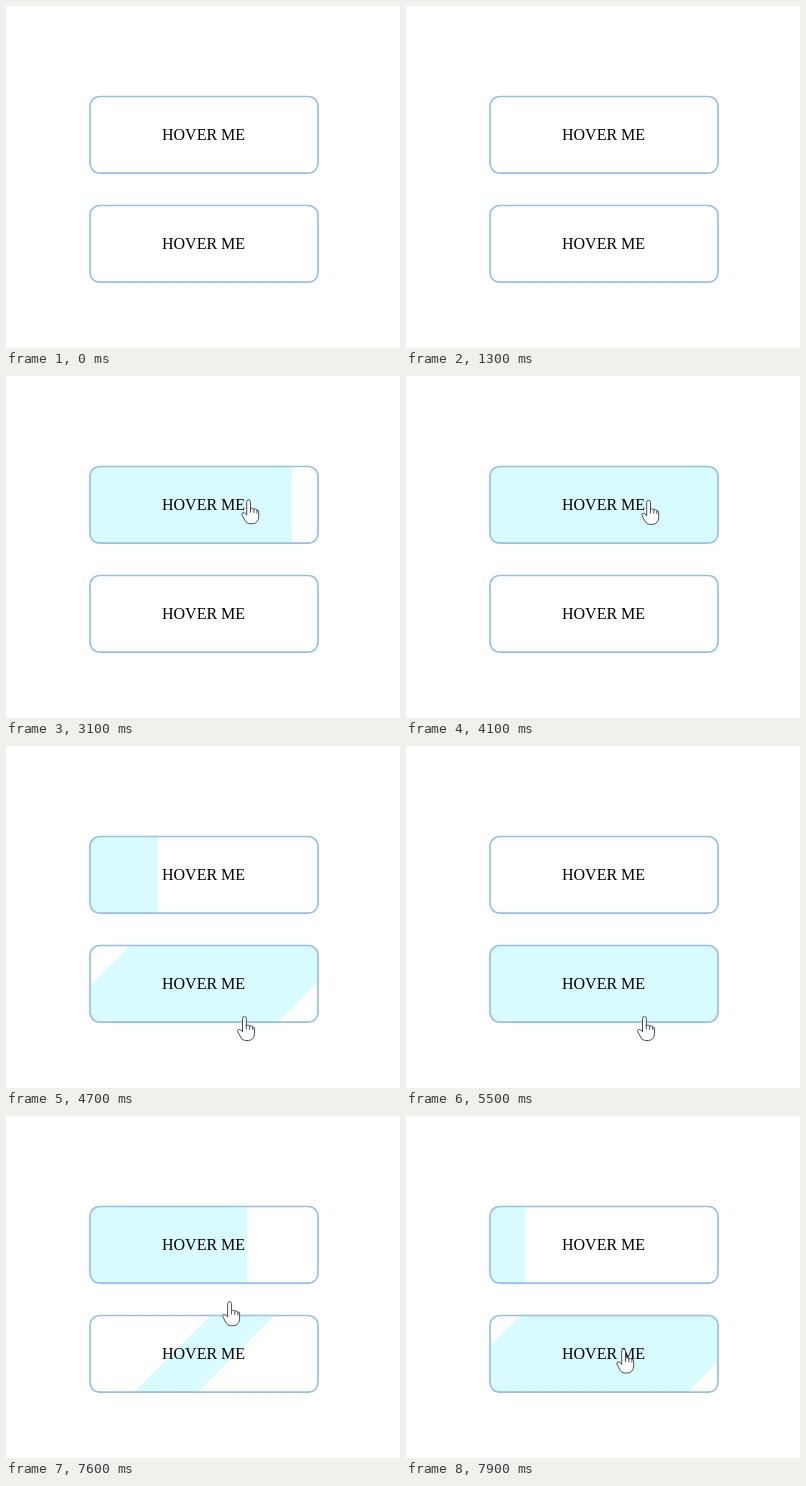
Animation of 394 by 342 pixels, one loop 8000 ms. Source, as an HTML page with a canvas:

```html
<!DOCTYPE html>
<html lang="en">
<head>
<meta charset="utf-8">
<title>Hover buttons</title>
<style>
  html, body { margin: 0; width: 100%; height: 100%; overflow: hidden; background: #fff; }
  canvas { display: block; width: 394px; height: 342px; }
</style>
</head>
<body>
<canvas id="stage"></canvas>
<script>
const W = 394, H = 342, LOOP = 8000, STEP = 100;
const canvas = document.getElementById('stage');
const ctx = canvas.getContext('2d');
const dpr = window.devicePixelRatio || 1;
canvas.width = W * dpr;
canvas.height = H * dpr;

const BOX = { x: 84, w: 228, h: 76.6, r: 9.5 };
const BORDER = '#92bfec', FILL = '#d8fbff';

// Moments when the pointer enters and leaves each button, alternating.
const buttons = [
  { y: 90.5, toggles: [2500, 4285, 7080, 7532], paint: paintSlide },
  { y: 199.5, toggles: [4382, 7055, 7630], paint: paintDiagonal }
];

// The pointer appears, then glides to each next resting place.
const appear = { time: 2500, x: 242.7, y: 123.7 };
const glides = [
  { from: 4080, to: 4600, x: 238.5, y: 270.5 },
  { from: 6830, to: 7300, x: 234.5, y: 98.5 },
  { from: 7300, to: 7800, x: 217.7, y: 233 }
];

const hand = new Path2D('M-2 15V2a1.9 1.9 0 0 1 3.8 0V9q2-1.3 3.4.6q2-1 3 .8q1.8-.3 1.8 2V17' +
  'q0 3-1.8 5q-1.5 2-4.2 2h-3q-3 0-4.3-2.5L-6.6 15.5q-1-2 .8-2.6q1.6-.3 3.8 2.1z');
const knuckles = new Path2D('M1.8 8.5v4M5.2 9.6v3.2M8.2 10.4v2.8');

// cubic-bezier(.25, .1, .25, 1)
function ease(x) {
  if (x <= 0) return 0;
  if (x >= 1) return 1;
  const curve = (a, b, s) => 3 * a * s * (1 - s) ** 2 + 3 * b * s * s * (1 - s) + s ** 3;
  let lo = 0, hi = 1;
  for (let i = 0; i < 30; i++) {
    const mid = (lo + hi) / 2;
    if (curve(0.25, 0.25, mid) < x) lo = mid; else hi = mid;
  }
  return curve(0.1, 1, lo);
}

function smooth(t, from, to) {
  const u = Math.min(1, Math.max(0, (t - from) / (to - from)));
  return u * u * (3 - 2 * u);
}

// One-second transition; a reversal takes time in proportion to what is left.
function level(toggles, t) {
  let from = 0, to = 0, start = 0, span = 1000;
  const at = s => from + (to - from) * ease((s - start) / span);
  for (const time of toggles) {
    if (time > t) break;
    from = at(time);
    to = 1 - to;
    start = time;
    span = Math.max(1, 1000 * Math.abs(to - from));
  }
  return at(t);
}

function paintSlide(v, y) {
  ctx.fillRect(BOX.x, y, BOX.w * v, BOX.h);
}

function paintDiagonal(v, y) {
  const thick = 289 * v;
  ctx.translate(BOX.x + BOX.w / 2, y + BOX.h / 2);
  ctx.rotate(-Math.PI / 4);
  ctx.fillRect(-BOX.w / 2, -thick / 2, BOX.w, thick);
}

function drawButton({ y, toggles, paint }, t) {
  const frame = new Path2D();
  frame.roundRect(BOX.x, y, BOX.w, BOX.h, BOX.r);
  const v = level(toggles, t);
  if (v > 0) {
    ctx.save();
    ctx.clip(frame);
    ctx.fillStyle = FILL;
    paint(v, y);
    ctx.restore();
  }
  ctx.strokeStyle = BORDER;
  ctx.lineWidth = 1.7;
  ctx.stroke(frame);
  ctx.fillStyle = '#000';
  ctx.font = '16px "Liberation Serif", "Times New Roman", serif';
  ctx.fontKerning = 'none';
  ctx.fillText('HOVER ME', 156, y + 43.5);
}

function drawPointer(t) {
  if (t < appear.time) return;
  let { x, y } = appear;
  for (const g of glides) {
    const k = smooth(t, g.from, g.to);
    x += (g.x - x) * k;
    y += (g.y - y) * k;
  }
  ctx.save();
  ctx.translate(x, y);
  ctx.fillStyle = '#fff';
  ctx.strokeStyle = '#464c5a';
  ctx.lineWidth = 1;
  ctx.lineJoin = ctx.lineCap = 'round';
  ctx.fill(hand);
  ctx.stroke(hand);
  ctx.stroke(knuckles);
  ctx.restore();
}

function draw(t) {
  ctx.setTransform(dpr, 0, 0, dpr, 0, 0);
  ctx.fillStyle = '#fff';
  ctx.fillRect(0, 0, W, H);
  for (const b of buttons) drawButton(b, t);
  drawPointer(t);
}

const begin = performance.now();
function tick() {
  const t = (performance.now() - begin) % LOOP;
  draw(Math.floor(t / STEP) * STEP);
  requestAnimationFrame(tick);
}
tick();
</script>
</body>
</html>
```
